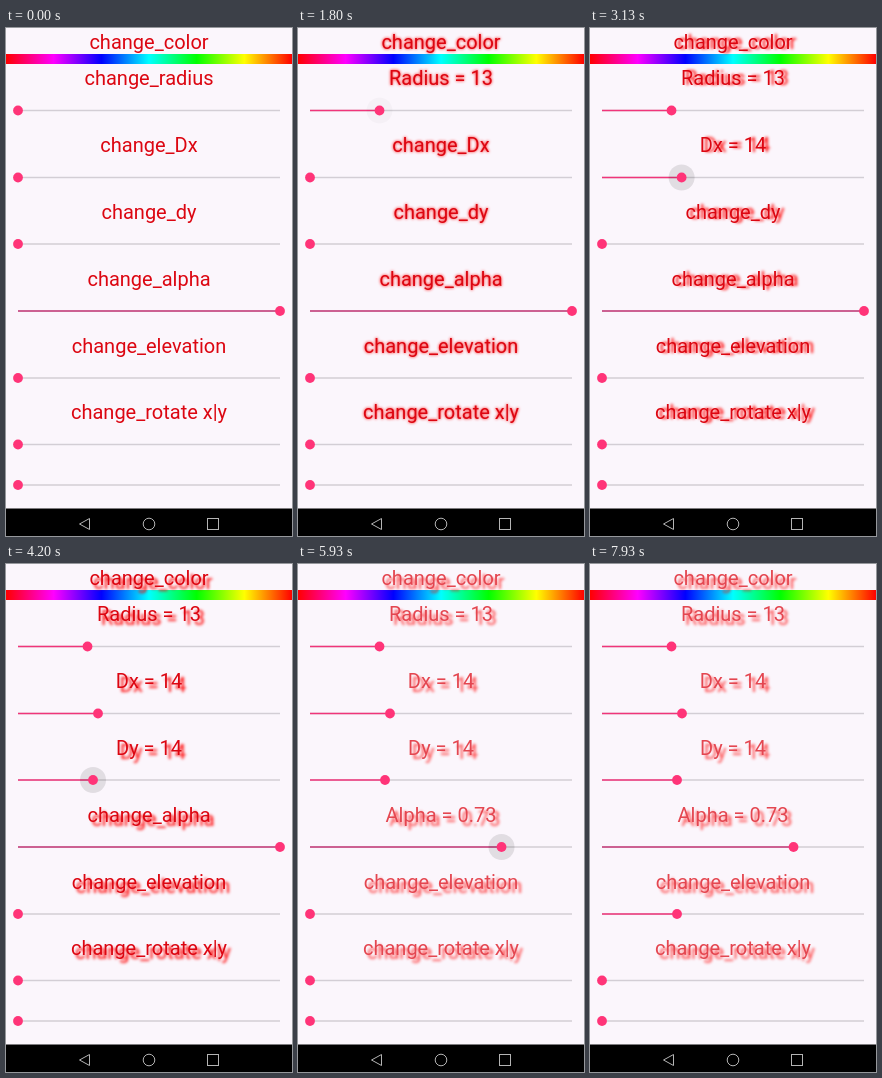
An HTML page for the animation above (8 s loop, 286 by 508 pixels).

```html
<!DOCTYPE html>
<html lang="en">
<head>
<meta charset="utf-8">
<style>
  html, body { margin: 0; width: 100%; height: 100%; overflow: hidden; background: #fbf6fc; }
  #stage { position: relative; width: 286px; height: 508px; overflow: hidden; }
  #stage svg { position: absolute; left: 0; top: 0; }
  .label {
    position: absolute; left: 0; width: 286px;
    font: 20px/24px Roboto, sans-serif; text-align: center; white-space: pre; color: #dc0611;
  }
  .bar {
    position: absolute; top: 26px; width: 286px; height: 10px;
    background: linear-gradient(90deg, #f00, #f0f, #00f, #0ff, #0f0, #ff0, #f00);
  }
</style>
</head>
<body>
<div id="stage">
  <div class="bar"></div>
  <svg id="sliders" width="286" height="508">
    <rect y="480.5" width="286" height="28"/>
    <g fill="none" stroke="#b4b4b4">
      <path d="M83.5 490.5V501.5L73.5 496Z"/>
      <circle cx="143" cy="496" r="5.8"/>
      <rect x="201.5" y="490.5" width="11" height="11"/>
    </g>
  </svg>
</div>
<script>
const LOOP = 8000, LEFT = 12, WIDTH = 262;
const stage = document.getElementById('stage');
const svg = document.getElementById('sliders');

// Each drag runs from start for dur ms, and the finger lifts at release.
const rows = [
  { label: 'change_radius', y: 82.5, from: 0, to: 0.2653, start: 950, dur: 564, release: 1650,
    text: f => 'Radius = ' + Math.floor(f * 50) },
  { label: 'change_Dx', y: 149.5, from: 0, to: 0.3053, start: 2106, dur: 1100, release: 3250,
    text: f => 'Dx = ' + Math.max(0, Math.floor(f * 50 - 1)) },
  { label: 'change_dy', y: 216, from: 0, to: 0.2863, start: 3500, dur: 650, release: 4330,
    text: f => 'Dy = ' + Math.floor(f * 50) },
  { label: 'change_alpha', y: 283, from: 1, to: 0.731, start: 4850, dur: 950, release: 6050,
    text: f => 'Alpha = ' + f.toFixed(2), track: '#c73a78' },
  { label: 'change_elevation', y: 350, from: 0, to: 0.2863, start: 6600, dur: 800, release: 7500 },
  { label: 'change_rotate x|y', y: 416.5, from: 0 },
  { y: 457, from: 0 }
];

function shape(tag, attrs) {
  const el = document.createElementNS('http://www.w3.org/2000/svg', tag);
  for (const key in attrs) el.setAttribute(key, attrs[key]);
  return svg.appendChild(el);
}

function addLabel(text, top) {
  const el = document.createElement('div');
  el.className = 'label';
  el.style.top = top + 'px';
  el.textContent = text;
  return stage.appendChild(el);
}

const labels = [addLabel('change_color', 1.5)];
for (const row of rows) {
  const { y, track = '#f0357a' } = row;
  const line = (color, x2) =>
    shape('line', { x1: LEFT, x2, y1: y, y2: y, stroke: color, 'stroke-width': 1.6 });
  line('#d3ced5', LEFT + WIDTH);
  row.active = line(track, LEFT);
  row.halo = shape('circle', { cy: y, r: 13, fill: '#000' });
  row.thumb = shape('circle', { cy: y, fill: '#ff3478' });
  if (row.label) labels.push(row.title = addLabel(row.label, y - 44.3));
}

const ramp = (t, a, b) => Math.min(1, Math.max(0, (t - a) / (b - a)));

function fraction({ from, to, start, dur }, t) {
  if (start === undefined) return from;
  return from + (to - from) * (1 - (1 - ramp(t, start, start + dur)) ** 2);
}

function draw(now) {
  const t = now % LOOP;
  const values = rows.map(row => fraction(row, t));

  rows.forEach((row, i) => {
    const f = values[i], x = LEFT + WIDTH * f;
    let swell = 0, halo = 0;
    if (row.start !== undefined) {
      const age = t - row.start;
      swell = ramp(age, 0, 100) - ramp(age, 250, 350);
      halo = ramp(age, 250, 600) - ramp(t, row.release, row.release + 200);
    }
    row.active.setAttribute('x2', x);
    row.thumb.setAttribute('cx', x);
    row.thumb.setAttribute('r', 4.9 + 1.4 * swell);
    row.halo.setAttribute('cx', x);
    row.halo.setAttribute('opacity', 0.1 * Math.max(0, halo));
    if (row.title) row.title.textContent = row.text && t > row.start ? row.text(f) : row.label;
  });

  const [radius, dx, dy, alpha] = values;
  const shadow = radius > 0
    ? `${dx * 13}px ${dy * 13}px ${radius * 11.5}px #f00` : 'none';
  for (const el of labels) {
    el.style.textShadow = shadow;
    el.style.opacity = alpha;
  }
}

const begin = performance.now();
function tick() {
  draw(performance.now() - begin);
  requestAnimationFrame(tick);
}
tick();
</script>
</body>
</html>
```
